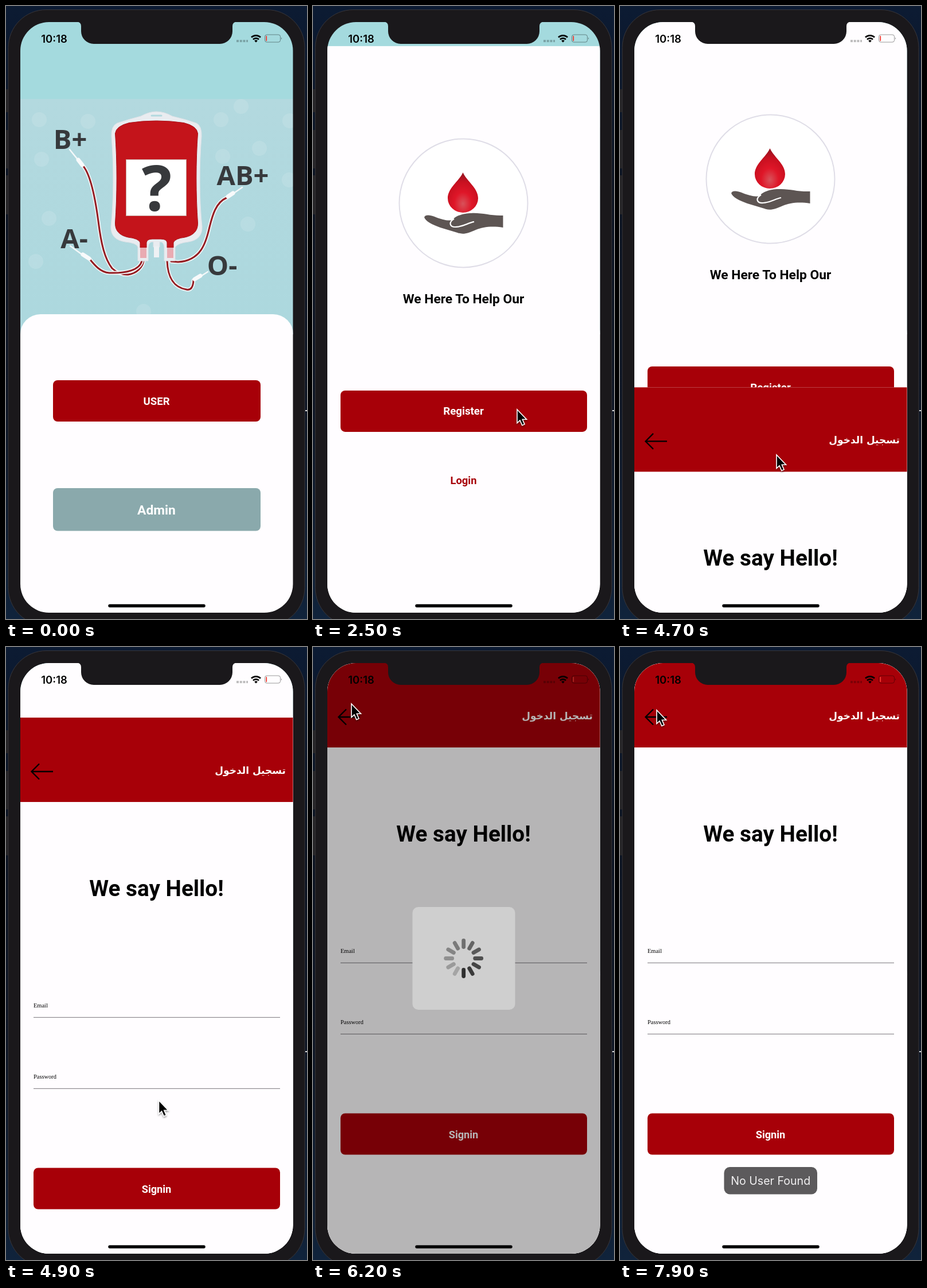
Write an HTML page that moves like this. It is 525 px wide and 1068 px high and loops after 8000 ms.

```html
<!DOCTYPE html>
<html lang="en">
<head>
<meta charset="utf-8">
<title>Blood donation app</title>
<style>
html, body { margin: 0; width: 100%; height: 100%; overflow: hidden; background: #0b1626; }
svg { display: block; width: 100vw; height: 100vh; }
text { font-family: Roboto, sans-serif; font-weight: 700; text-anchor: middle; }
.light { fill: #fff; }
.red { fill: #a70008; }
.blood text { font-family: "Open Sans", sans-serif; font-size: 47px; fill: #37393c; }
.label { font: 10.4px "Liberation Serif", serif; text-anchor: start; }
.line { stroke: #77757a; stroke-width: 1; }
.ui { font-family: Inter, sans-serif; }
</style>
</head>
<body>
<svg viewBox="0 0 525 1068" preserveAspectRatio="none">
  <defs>
    <linearGradient id="sky" x1="0" y1="0" x2="0" y2="1">
      <stop offset="0" stop-color="#0c1b33"/><stop offset=".3" stop-color="#0a1220"/>
      <stop offset=".65" stop-color="#0d1524"/><stop offset="1" stop-color="#10233b"/>
    </linearGradient>
    <linearGradient id="wall" x1="0" y1="0" x2="0" y2="1">
      <stop offset="0" stop-color="#b3d9df"/><stop offset="1" stop-color="#acd8de"/>
    </linearGradient>
    <radialGradient id="drop" cx=".5" cy=".78" r=".72">
      <stop offset="0" stop-color="#d8525a"/><stop offset=".4" stop-color="#df1628"/>
      <stop offset=".75" stop-color="#c91020"/><stop offset="1" stop-color="#9c1420"/>
    </radialGradient>
    <filter id="shadow" x="-50%" y="-50%" width="200%" height="200%">
      <feDropShadow dx="0" dy="2" stdDeviation="1.5" flood-opacity=".4"/>
    </filter>
    <clipPath id="screen"><rect x="25" y="28" width="475.500" height="1029" rx="50"/></clipPath>
  </defs>

  <rect width="525" height="1068" fill="url(#sky)"/>
  <path d="M0 145h4v40h-4zM0 216h4v67h-4zM0 295h4v68h-4z" fill="#252426"/>
  <rect x="522" y="704" width="3" height="2" fill="#ddd"/>
  <rect x="4" y="6.500" width="517" height="1073" rx="66" fill="#1a181b" stroke="#38363a"/>

  <g clip-path="url(#screen)">
    <g id="home">
      <rect x="25" y="28" width="476" height="134" fill="#a4dade"/>
      <rect x="25" y="162" width="476" height="410" fill="url(#wall)"/>
      <g id="spots" fill="#fff" opacity=".12"></g>

      <g fill="none" stroke-linecap="round">
        <g id="tubes"></g>
        <path d="M111 250L128 271M112 418L134 434M412 316L396 327M352 463L338 472" stroke="#f4f8f9" stroke-width="2.500"/>
        <path d="M126 268L133 277M134 433L145 440M396 326L387 332M339 470L329 476" stroke="#f8fafb" stroke-width="7"/>
      </g>

      <path fill="#e9ecf0" stroke="#dde1e6" d="M194 204Q215 197 235 192Q250 184 262 184Q276 184 290 192Q312 197 332 204Q342 209 341 228C337 275 337 340 342 384Q343 407 318 411Q300 413 295 420V444H276V420Q275 410 268 411V420H257V411Q249 410 248 420V444H230V420Q228 413 208 411Q182 407 183 384C188 340 188 275 184 228Q183 209 194 204Z"/>
      <path d="M254 191H271" stroke="#b2d9df" stroke-width="3" stroke-linecap="round"/>
      <path fill="#c4141b" stroke="#a91219" d="M190.500 222Q192 209 215 203.500Q238 200 262.500 200Q287 200 310 203.500Q333 209 334.500 222C331 270 331 330 334.500 378Q335 398 312 403Q295 405 292 412V421H281V412Q280 406 270 406H255Q246 406 245 412V421H234V412Q231 405 213 403Q190 398 190.500 378C194 330 194 270 190.500 222Z"/>
      <rect x="209.500" y="267.500" width="105" height="98" fill="#fff" stroke="#c49c96"/>
      <path d="M234 421h11v18h-11zM281 421h11v18h-11z" fill="#e9abb2"/>
      <rect x="258" y="419" width="9" height="19" fill="#eef1f4"/>
      <g class="blood">
        <text x="112" y="249">B+</text>
        <text x="119" y="422">A-</text>
        <text x="413" y="312">AB+</text>
        <text x="377" y="469">O-</text>
        <text x="263" y="357" style="font-size:110px">?</text>
      </g>

      <path d="M25 1068V572A35 35 0 0 1 60 537H466A35 35 0 0 1 501 572V1068Z" fill="#fffdff"/>
      <rect class="red" x="82" y="652" width="362" height="72" rx="8"/>
      <text class="light" x="262.500" y="695" font-size="18.600">USER</text>
      <rect x="82" y="840" width="362" height="74.500" rx="8" fill="#8aa9ac"/>
      <text class="light" x="262.500" y="886" font-size="22.800">Admin</text>
    </g>

    <g id="welcome">
      <rect x="25" y="28" width="476" height="1040" fill="#fffdff"/>
      <circle cx="262.500" cy="301.500" r="112" fill="#fff" stroke="#dfdde7" stroke-width="2"/>
      <path d="M261.500 248C268 263 288 275 288 293A26.500 25 0 0 1 235 293C235 275 255 263 261.500 248Z" fill="url(#drop)"/>
      <path d="M194 326C196 321 204 322 212 325C224 330 236 333 243 331C250 322 266 319 276 319C296 318 310 324 331.500 323V344C312 341 296 343 284 348C270 354 262 357 252 353L222 344C208 339 196 333 194 326Z" fill="#5d5553"/>
      <path d="M246 329C236 335 238 344 250 343C264 342 270 336 281 334" fill="none" stroke="#fff" stroke-width="2.200"/>
      <text x="262.500" y="476" font-size="22.800">We Here To Help Our</text>
      <rect class="red" x="48" y="628" width="430" height="72" rx="8"/>
      <text class="light" x="262.500" y="670.500" font-size="18.700">Register</text>
      <text class="red" x="262.500" y="791.500" font-size="18.400">Login</text>
    </g>

    <g id="signin">
      <rect x="25" y="28" width="476" height="1040" fill="#fffdff"/>
      <rect class="red" x="25" y="28" width="476" height="147"/>
      <path d="M82 122H45M58 108.500L44.500 122L58 135.500" fill="none" stroke="#000" stroke-width="2.300"/>
      <text class="light" x="488" y="125.500" font-size="17" style="font-family:'DejaVu Sans',sans-serif;text-anchor:end">تسجيل الدخول</text>
      <text x="262.500" y="338.500" font-size="38.700">We say Hello!</text>
      <text class="label" x="48" y="533">Email</text>
      <text class="label" x="48" y="657">Password</text>
      <path class="line" d="M48 550.300H478M48 674.300H478"/>
      <rect class="red" x="48" y="812.500" width="430" height="72" rx="8"/>
      <text class="light" x="262.500" y="855.500" font-size="18.200">Signin</text>
    </g>

    <g>
      <text class="ui" x="84" y="63.500" font-size="18.500" style="font-weight:600">10:18</text>
      <path d="M402 61H422" stroke="#000" stroke-opacity=".25" stroke-width="4" stroke-dasharray="4 1.700"/>
      <path d="M428 54.600A11.400 11.400 0 0 1 444 54.600M431 58.200A7 7 0 0 1 441 58.200" fill="none" stroke="#000" stroke-width="2.700"/>
      <path d="M433.200 60.500A4 4 0 0 1 438.800 60.500L436 63.600Z"/>
      <rect x="451.500" y="50" width="27" height="13" rx="3.500" fill="none" stroke="#000" stroke-opacity=".4"/>
      <path d="M480 54.500Q482 56.500 480 58.500Z" opacity=".45"/>
      <rect x="453.300" y="52" width="1.800" height="9" rx=".8" fill="#f0382f"/>
    </g>

    <g id="loading">
      <rect x="25" y="28" width="476" height="1029" opacity=".285"/>
      <rect x="173.500" y="453" width="179" height="179" rx="10" fill="#cfcfcf"/>
      <g id="spinner" stroke="#222" stroke-width="6.800" stroke-linecap="round"></g>
    </g>
    <g id="toast">
      <rect x="181.500" y="906" width="162.500" height="47.500" rx="10" fill="#5c5a5c"/>
      <text class="ui" x="262.700" y="937" font-size="19.600" fill="#f0eff0" style="font-weight:400">No User Found</text>
    </g>
    <path d="M181 1045H345" stroke="#050406" stroke-width="5.500" stroke-linecap="round"/>
  </g>

  <path d="M123 27Q131 28 131 35V44A22 22 0 0 0 153 66H373A22 22 0 0 0 395 44V35Q395 28 403 27Z" fill="#1a181b"/>
  <path id="cursor" d="M0 0V23.500L5 18.800L8.800 27.500L13 25.700L9.300 17.200H16.500Z" fill="#000" stroke="#fff" stroke-width="1.600" filter="url(#shadow)"/>
</svg>
<script>
const $ = id => document.getElementById(id);
const clamp = v => Math.min(1, Math.max(0, v));
const ramp = (t, start, length) => clamp((t - start) / length);
const smooth = u => u * u * (3 - 2 * u);

const spots = [[58,198],[143,201],[62,267],[375,198],[410,175],[442,248],[378,262],
  [75,370],[422,380],[52,445],[240,532],[495,200],[494,303]];
$("spots").innerHTML = spots.map(([x, y]) => `<circle cx="${x}" cy="${y}" r="13"/>`).join("");

const tubes = [
  "M133 277C146 290 155 330 161 375C166 415 172 440 185 457Q198 469 213 468C228 466 239 455 240 443",
  "M146 441C155 452 165 464 180 465C210 466 233 460 237 444",
  "M385 334C366 342 360 365 355 385C349 412 340 444 300 446L288 445",
  "M281 444C282 470 290 490 315 494Q326 496 327 478"
];
$("tubes").innerHTML = tubes.map(d =>
  `<path d="${d}" stroke="#f1f5f6" stroke-width="6.5"/><path d="${d}" stroke="#941b21" stroke-width="3"/>`).join("");

$("spinner").innerHTML = Array.from({ length: 12 }, (_, i) =>
  `<path d="M262.700 511.500V522.500" transform="rotate(${i * 30} 262.700 542.500)"/>`).join("");
const spokes = [...$("spinner").children];

// time, x, y of the pointer tip
const stops = [[900,330,1090],[1400,356,703],[3000,356,703],[3600,273,782],[4700,273,782],
  [4900,266.5,790],[5400,262,845],[5700,262,845],[6200,67,99],[7500,67,99],[7900,64,110]];

function pointer(t) {
  const i = stops.findIndex(s => s[0] > t);
  if (i === 0) return stops[0].slice(1);
  if (i < 0) return stops.at(-1).slice(1);
  const [a, b] = [stops[i - 1], stops[i]];
  const u = smooth(ramp(t, a[0], b[0] - a[0]));
  return [1, 2].map(k => a[k] + (b[k] - a[k]) * u);
}

function slideUp(id, t, start) {
  const y = 1029 * (1 - ramp(t, start, 500)) ** 3;
  $(id).setAttribute("transform", `translate(0 ${y})`);
}

function draw(t) {
  slideUp("welcome", t, 2173);
  slideUp("signin", t, 4627);
  $("loading").setAttribute("opacity", ramp(t, 5750, 200) - ramp(t, 7500, 200));
  $("toast").setAttribute("opacity", ramp(t, 7550, 200));
  const head = Math.floor((t - 6160) * 12 / 1000) + 6;
  spokes.forEach((s, i) => {
    const age = ((head - i) % 12 + 12) % 12;
    s.setAttribute("opacity", .92 - age * .062);
  });
  $("cursor").setAttribute("transform", `translate(${pointer(t)})`);
}

const begin = performance.now();
function tick() {
  draw((performance.now() - begin) % 8000);
  requestAnimationFrame(tick);
}
tick();
</script>
</body>
</html>
```
